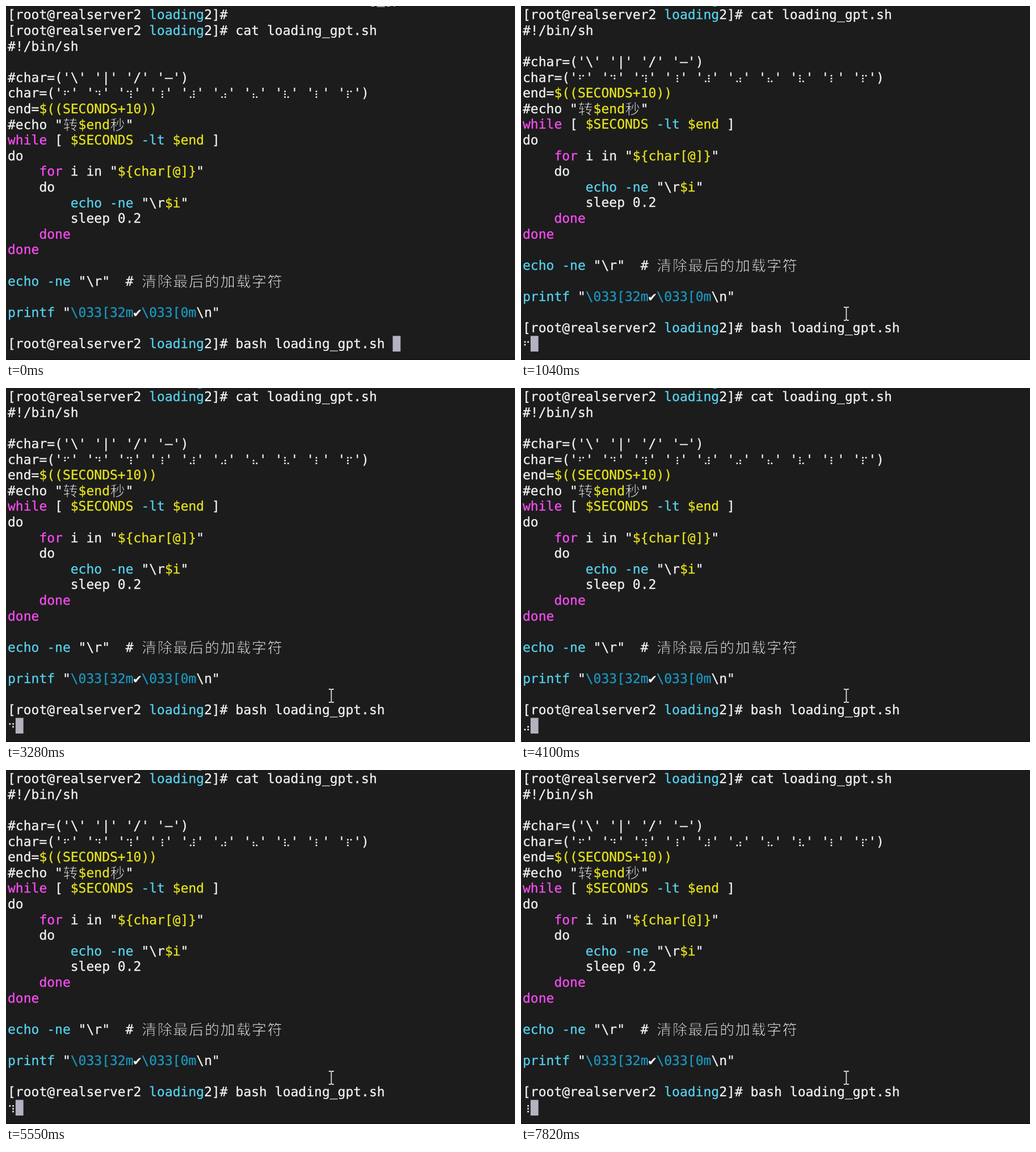
An HTML page that plays this animation: 897x624 px, repeating every 8000 ms.

```html
<!DOCTYPE html>
<html lang="zh">
<head>
<meta charset="utf-8">
<title>Terminal spinner</title>
<style>
  html, body { margin: 0; width: 100%; height: 100%; overflow: hidden; background: #1c1c1c; }
  svg { display: block; }
  text {
    font: 23px "DejaVu Sans Mono", monospace; white-space: pre; text-rendering: geometricPrecision;
    fill: currentColor; stroke: currentColor; stroke-width: 0.3px;
  }
  /* a background-coloured outline thins the strokes */
  text.han {
    font: 300 26px "Noto Sans CJK SC", "Noto Sans CJK JP", "Noto Sans CJK", sans-serif;
    letter-spacing: 1.7px; stroke: #1c1c1c; stroke-width: 0.8px;
  }
</style>
</head>
<body>
<svg id="stage" width="897" height="624" viewBox="0 0 897 624">
  <rect width="897" height="624" fill="#1c1c1c"/>
  <g id="screen"></g>
  <g id="spinner"></g>
  <rect id="caret" width="13.8" height="27.6" fill="#b5b1c1"/>
  <g id="pointer" fill="none">
    <path d="M-4.5-11.5H-1.5L0-10.5L1.5-11.5H4.5M0-10.5V10.5M-4.5 11.5H-1.5L0 10.5L1.5 11.5H4.5" stroke="#d8d8d8" stroke-width="1.8"/>
  </g>
  <rect y="622.5" width="897" height="1.5" fill="#121212"/>
</svg>

<!-- "§" plus a letter switches the colour -->
<script type="text/plain" id="listing">[root@realserver2 §cloading§w2]#
[root@realserver2 §cloading§w2]# cat loading_gpt.sh
#!/bin/sh

#char=('\' '|' '/' '—')
char=('⠋' '⠙' '⠹' '⠸' '⠼' '⠴' '⠦' '⠧' '⠇' '⠏')
end=§y$((SECONDS+10))
#echo "转§y$end§w秒"
§mwhile§w [ §y$SECONDS§c -lt §y$end§w ]
do
    §mfor§w i in "§y${char[@]}§w"
    do
        §cecho -ne §w"\r§y$i§w"
        sleep 0.2
    §mdone
§mdone

§cecho -ne §w"\r"  # 清除最后的加载字符

§cprintf §w"§t\033[32m§w✔§t\033[0m§w\n"

[root@realserver2 §cloading§w2]# bash loading_gpt.sh</script>

<script>
const LOOP = 8000, LEFT = 3, CELL = 13.847, ROW = 27.6, BASE = 23.3;
const RUN_AT = 1040, PROMPT_ROW = 21, PROMPT_COLS = 49;
const COLORS = { w: '#f2f2f2', c: '#56d3ef', y: '#e6e31a', m: '#fa4cf4', t: '#1a98c0' };
const SPINNER = [...'⠋⠙⠹⠸⠼⠴⠦⠧⠇⠏'];

// [step, time] knots; steps between them are evenly spaced
const STEPS = [[0, 1040], [1, 1220], [5, 2020], [6, 2250], [11, 3280], [12, 3480],
  [16, 4280], [17, 4570], [19, 4940], [20, 5130], [22, 5550], [23, 5800],
  [26, 6410], [27, 6590], [28, 6830], [29, 7030], [33, 7820], [34, 8020]];

// [time, x, y] of the mouse pointer
const POINTER = [[280, 212, 612], [327, 335, 575], [375, 432, 551], [422, 545, 544], [470, 573.3, 542.5]];

const $ = id => document.getElementById(id);
const colX = col => LEFT + col * CELL;
const baseline = row => BASE + row * ROW;

function add(parent, tag, attrs, content = '') {
  const el = document.createElementNS('http://www.w3.org/2000/svg', tag);
  for (const name in attrs) el.setAttribute(name, attrs[name]);
  el.textContent = content;
  return parent.appendChild(el);
}

function drawBraille(parent, char, col, row) {
  const bits = char.charCodeAt(0) - 0x2800;
  for (let dot = 0; dot < 6; dot++) {
    if (!(bits >> dot & 1)) continue;
    add(parent, 'rect', {
      x: colX(col) + 2.6 + Math.floor(dot / 3) * 5.6,
      y: baseline(row) - 12.1 + dot % 3 * 5,
      width: 2.7, height: 2.7, rx: 0.6, fill: COLORS.w
    });
  }
}

function drawLine(line, row, col = 0) {
  let color = COLORS.w;
  for (const run of line.match(/§.|[⠀-⣿]|[一-鿿]+|[^§⠀-⣿一-鿿]+/g) || []) {
    if (run[0] === '§') { color = COLORS[run[1]]; continue; }
    const han = /[一-鿿]/.test(run);
    if (/[⠀-⣿]/.test(run)) {
      drawBraille($('screen'), run, col, row);
    } else {
      const attrs = { x: colX(col) + (han ? 0.8 : 0), y: baseline(row) + (han ? 2 : 0), color };
      if (han) attrs.class = 'han';
      add($('screen'), 'text', attrs, run);
    }
    col += run.length * (han ? 2 : 1);
  }
}

function stepAt(t) {
  const k = STEPS.findIndex(([, time]) => t < time);
  const [s0, t0] = STEPS[k - 1], [s1, t1] = STEPS[k];
  return Math.floor(s0 + (s1 - s0) * (t - t0) / (t1 - t0) + 1e-6);
}

let shownChar = '';
function render(t) {
  const running = t >= RUN_AT;
  $('screen').setAttribute('transform', `translate(0 ${running ? -ROW : 0})`);
  $('caret').setAttribute('x', colX(running ? 1 : PROMPT_COLS));
  $('caret').setAttribute('y', baseline(PROMPT_ROW) - 21.4);

  const char = running ? SPINNER[stepAt(t) % SPINNER.length] : '';
  if (char !== shownChar) {
    $('spinner').textContent = '';
    if (char) drawBraille($('spinner'), char, 0, PROMPT_ROW);
    shownChar = char;
  }

  const spot = POINTER.filter(([time]) => t >= time).pop();
  $('pointer').setAttribute('visibility', spot ? 'visible' : 'hidden');
  if (spot) $('pointer').setAttribute('transform', `translate(${spot[1]} ${spot[2]})`);
}

drawLine('loading_gpt.sh', -1, 40);
$('listing').textContent.split('\n').forEach((line, row) => drawLine(line, row));

const start = performance.now();
function tick() {
  render((performance.now() - start) % LOOP);
  requestAnimationFrame(tick);
}
render(0);
requestAnimationFrame(tick);
</script>
</body>
</html>
```
